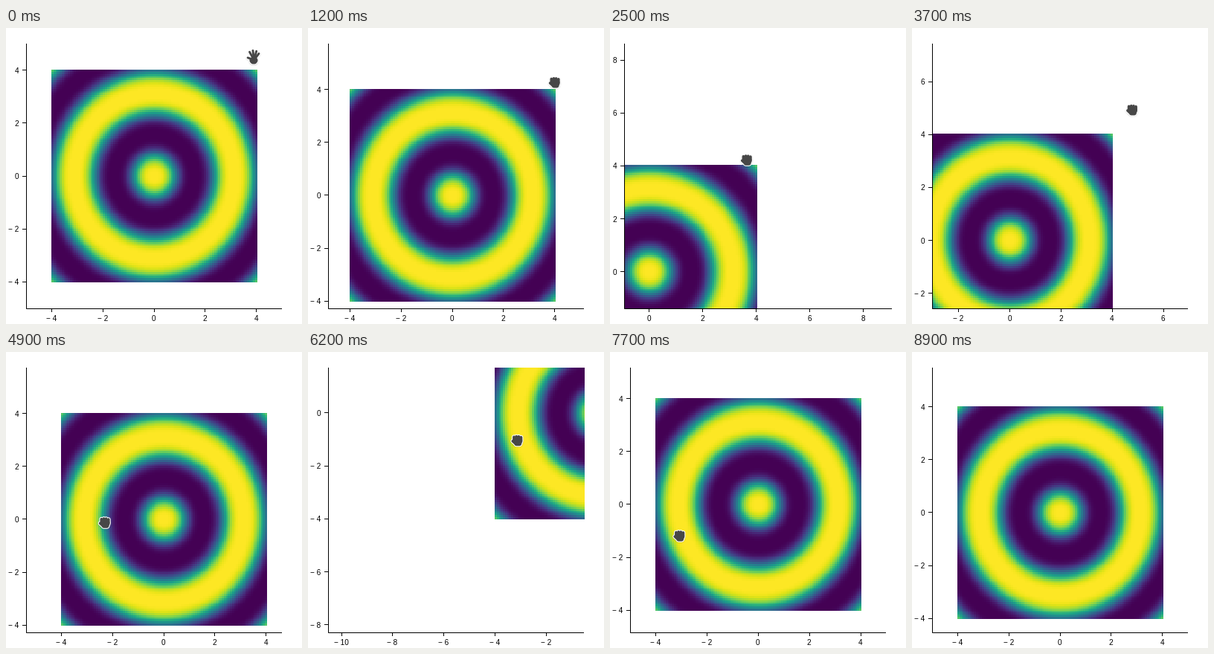
A matplotlib script for the animation above (9.8 s loop, 398x398 px).

```python
import numpy as np
import matplotlib.pyplot as plt
from matplotlib.animation import FuncAnimation
from matplotlib.patches import Rectangle

SIZE, DPI = 398, 100
PX = 72 / DPI
STEP, LOOP = 100, 9800
TOP, BOTTOM = 21, 377
SPAN = 10
CELLS = 100
HALF = 4.015
Y_SCALE = (BOTTOM - TOP) / SPAN

plt.rcParams["font.family"] = "Liberation Sans"

# key points of the panned view: time, offset in data units
VIEW = np.array([
    (900, 0, 0), (1200, .145, .73), (2500, 4.056, 3.62), (2700, 4.55, 4.05),
    (3200, 4.55, 4.05), (4100, .1, 1.28), (4700, .1, 1.28),
    (4900, -.38, .73), (5000, -1.15, -.17), (5900, -5.525, -3.287),
    (6250, -5.525, -3.287), (7100, -.107, -1.264), (8000, 0, .477),
])

# drags: start, end, hand position at zero offset, pixels per unit
DRAGS = [(700, 4200, (341, 39), 36.0), (4700, 8300, (93, 235.5), 34.4)]

# free moves of the open hand: start, end, from, to
GLIDES = [
    (0, 200, (332, 39), (331, 58)), (300, 700, (331, 58), (341, 39)),
    (4100, 4700, (338, 85), (89, 282)), (8200, 8900, (93, 253), (35, -10)),
]


def ease(s):
    s = np.clip(s, 0, 1)
    return s * s * (3 - 2 * s)


def view_at(t):
    """Monotone cubic curve through the key points, still outside them."""
    ts, pts = VIEW[:, 0], VIEW[:, 1:]
    t = np.clip(t, ts[0], ts[-1])
    d = np.diff(pts, axis=0) / np.diff(ts)[:, None]
    prod = d[:-1] * d[1:]
    slope = np.zeros_like(pts)
    slope[1:-1] = np.where(
        prod > 0, 2 * prod / np.where(prod > 0, d[:-1] + d[1:], 1), 0)
    i = min(np.searchsorted(ts, t, side="right") - 1, len(ts) - 2)
    w = ts[i + 1] - ts[i]
    s = (t - ts[i]) / w
    return (pts[i] + (pts[i + 1] - pts[i]) * ease(s)
            + w * s * (1 - s) * (slope[i] * (1 - s) - slope[i + 1] * s))


def hand_at(t):
    """Hand position and whether it is closed; a held view trails one step."""
    for start, end, (x, y), scale in DRAGS:
        if start <= t < end:
            u, v = view_at(t + STEP)
            return x - u * scale, y + v * Y_SCALE, True
    start, end, a, b = [g for g in GLIDES if g[0] <= t][-1]
    x, y = np.array(a) + np.subtract(b, a) * ease((t - start) / (end - start))
    return x, y, False


fig = plt.figure(figsize=(SIZE / DPI, SIZE / DPI), dpi=DPI, facecolor="white")
ax = fig.add_axes([0, 0, 1, 1])
ax.axis("off")

grid = np.linspace(-4, 4, CELLS)
radius = np.hypot(*np.meshgrid(grid, grid))
image = ax.imshow(ease(np.cos(radius) ** 2), cmap="viridis", vmin=0, vmax=1,
                  interpolation="nearest", aspect="auto", zorder=1)
ax.set_xlim(0, SIZE)
ax.set_ylim(SIZE, 0)
window = Rectangle((0, 0), 1, 1, transform=ax.transData)


def thin_line():
    line, = ax.plot([], [], color="black", lw=PX, zorder=2, snap=False,
                    solid_capstyle="butt", solid_joinstyle="miter")
    return line


def label_pool(align):
    return [ax.text(0, 0, "", size=10 * PX, ha=align, va="baseline",
                    color="black", zorder=2) for _ in range(7)]


axes_line, tick_line = thin_line(), thin_line()
x_labels, y_labels = label_pool("center"), label_pool("right")


def open_strokes():
    """Thumb and fingers fan out from the palm: x0, y0, x1, y1, width."""
    for angle in (-70, -29, -7, 15, 37):
        length = 12.8 - .001 * (angle + 8) ** 2
        a = np.radians(angle)
        yield (1.5, 4, 1.5 + length * np.sin(a), 4 - length * np.cos(a), 2.9)
    yield (-.2, 4.5, 2.2, 4.5, 8.8)
    yield (-.2, 7, 2.4, 7, 5)


def fist_strokes():
    for x in np.linspace(-4.2, 5.2, 4):
        yield (x, 0, x, .04 * x * x - 5.4, 3.8)
    yield (-3, 3.5, -6, .8, 3.6)
    yield (-1, .8, 2.4, .8, 9.5)
    yield (-1, 4.3, 3, 4.3, 6)


def make_hand(strokes):
    layers = [("black", 3.4, .06, .8), ("white", 2.2, 1, 0),
              ("#474747", 0, 1, 0)]
    parts = []
    for x0, y0, x1, y1, width in strokes:
        for z, (color, extra, alpha, drop) in enumerate(layers):
            line, = ax.plot([], [], color=color, alpha=alpha, zorder=5 + z,
                            lw=(width + extra) * PX, solid_capstyle="round",
                            snap=False)
            parts.append((line, np.array([x0, x1]),
                          np.array([y0, y1]) + drop))
    return parts


open_hand, fist = make_hand(open_strokes()), make_hand(fist_strokes())


def place_hand(parts, x, y, visible):
    for line, xs, ys in parts:
        line.set_visible(visible)
        line.set_data(xs + x, ys + y)


def even_ticks(low):
    return range(2 * int(np.ceil(low / 2)), int(np.floor(low + SPAN)) + 1, 2)


def fill_labels(pool, items):
    for text in pool:
        text.set_text("")
    for text, (value, x, y) in zip(pool, items):
        sign = "\u2212 " if value < 0 else ""
        text.set_text(f"{sign}{abs(value)}")
        text.set_position((x, y))


def crisp(value):
    return np.floor(value) + .5


def draw(frame):
    t = frame * STEP
    u, v = view_at(t)
    x_low, y_low = u - SPAN / 2, v - SPAN / 2

    # the margins follow the widest vertical label
    left = 27 if y_low <= -2 else 19
    right = SIZE - left
    scale = (right - left) / SPAN

    def to_x(value):
        return left + (value - x_low) * scale

    def to_y(value):
        return BOTTOM - (value - y_low) * Y_SCALE

    image.set_extent((to_x(-HALF), to_x(HALF), to_y(-HALF), to_y(HALF)))
    window.set_bounds(left, TOP, right - left, BOTTOM - TOP)
    image.set_clip_path(window)

    ax_x, ax_y = crisp(left), crisp(BOTTOM)
    axes_line.set_data([ax_x, ax_x, right], [TOP, ax_y, ax_y])

    xs, ys = [], []
    for n in even_ticks(x_low):
        xs += [crisp(to_x(n))] * 2 + [np.nan]
        ys += [BOTTOM, BOTTOM + 5, np.nan]
    for n in even_ticks(y_low):
        xs += [left - 5, left, np.nan]
        ys += [crisp(to_y(n))] * 2 + [np.nan]
    tick_line.set_data(xs, ys)
    fill_labels(x_labels, [(n, to_x(n) - .5, 394) for n in even_ticks(x_low)])
    fill_labels(y_labels, [(n, left - 9.5, to_y(n) + 4)
                           for n in even_ticks(y_low)])

    x, y, closed = hand_at(t)
    place_hand(open_hand, x, y, not closed)
    place_hand(fist, x, y, closed)
    return []


anim = FuncAnimation(fig, draw, frames=LOOP // STEP, interval=STEP,
                     repeat=True, repeat_delay=0, blit=False)
plt.show()
```
